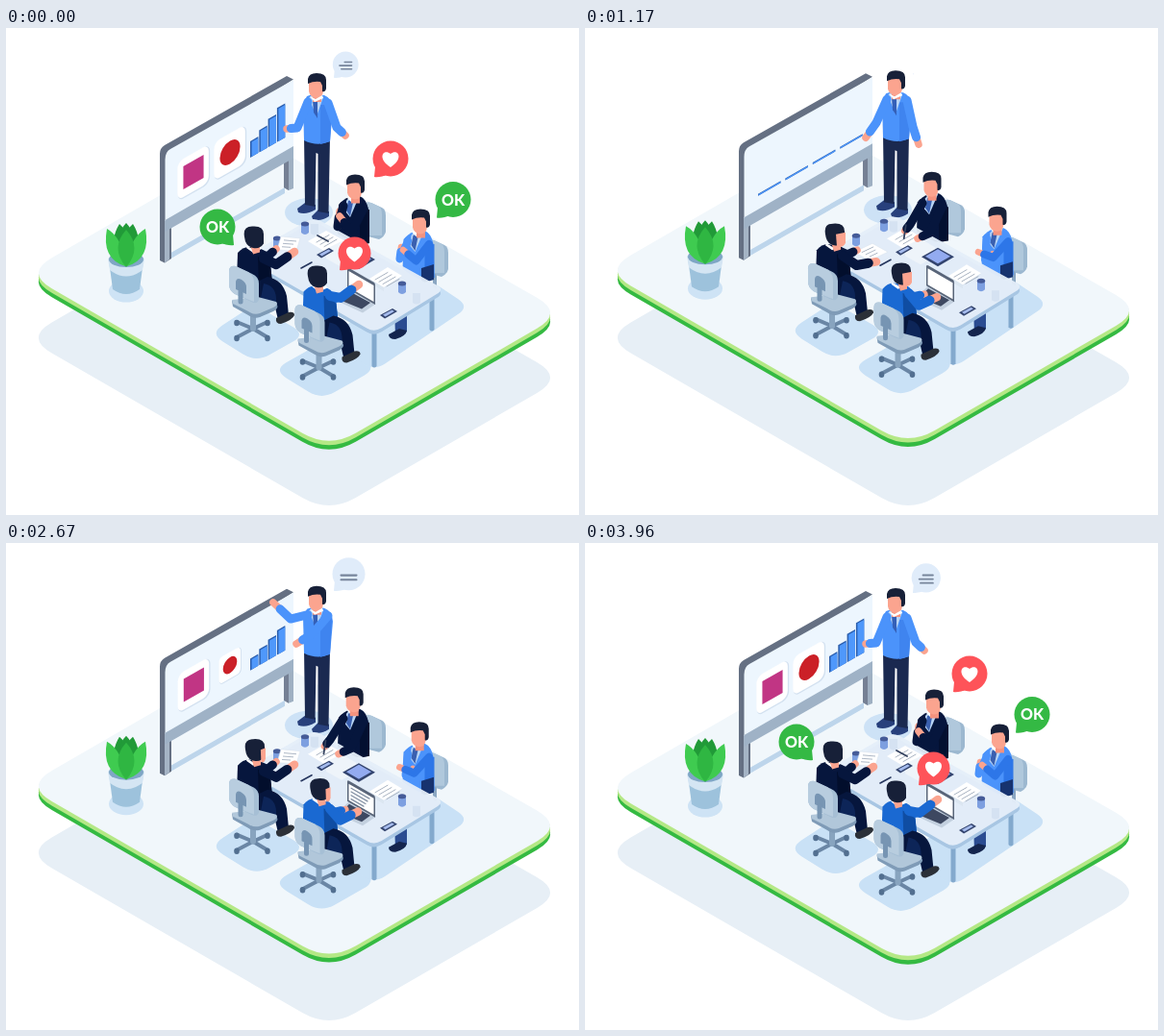
These frames come from a looping animation (596x507 px, 3.99 s). An HTML page:

```html
<!DOCTYPE html>
<html lang="en">
<head>
<meta charset="utf-8">
<title>Team meeting</title>
<style>
html, body { margin: 0; width: 100%; height: 100%; overflow: hidden; background: #fff; }
svg { display: block; width: 596px; height: 507px; }
text { font: 800 16px Lato, Inter, sans-serif; fill: #fff; text-anchor: middle; }
.arm { fill: none; stroke-linecap: round; stroke-linejoin: round; }
</style>
</head>
<body>
<script>
const LOOP = 3990, ISO = .577;
const SKIN = '#fba48f', HAIR = '#172038', NAVY = '#06163d', BLUE = '#4b93fb', ROYAL = '#1a69d2', FLOOR = '#c9e1f6';

// ---- easing ----
const mix = (a, b, u) => a + (b - a) * u;
const mixAll = (a, b, u) => a.map((v, i) => mix(v, b[i], u));
function ramp(t, from, to) {
  const u = Math.min(1, Math.max(0, (t - from) / (to - from)));
  return u * u * (3 - 2 * u);
}
// shown from `start` on, over the loop's end, until `stop`
const wrap = (t, start, stop, span) => t < LOOP / 2 ? 1 - ramp(t, stop - span, stop) : ramp(t, start, start + span);

const busy = (t, release = 2600) => ramp(t, 250, 650) - ramp(t, release, release + 450);
const laid = t => ramp(t, 450, 1100) - ramp(t, 1250, 1700);

// ---- shape helpers ----
const path = (d, fill, more = '') => `<path d="${d}" fill="${fill}" ${more}/>`;
const line = (d, stroke, w, more = '') =>
  `<path d="${d}" fill="none" stroke="${stroke}" stroke-width="${w}" stroke-linecap="round" ${more}/>`;
const oval = (x, y, rx, ry, fill) => `<ellipse cx="${x}" cy="${y}" rx="${rx}" ry="${ry}" fill="${fill}"/>`;
const at = (x, y, body) => `<g transform="translate(${x} ${y})">${body}</g>`;
const repeat = (n, f) => Array.from({ length: n }, (_, i) => f(i)).join('');

// polygon with corners rounded over a distance r
function rounded(pts, r) {
  const toward = (p, q) => mixAll(p, q, r / Math.hypot(q[0] - p[0], q[1] - p[1]));
  return pts.map((p, i) => {
    const n = pts.length;
    return `${i ? 'L' : 'M'}${toward(p, pts[(i + n - 1) % n])}Q${p} ${toward(p, pts[(i + 1) % n])}`;
  }).join('') + 'Z';
}

// an arm is a shoulder, a moving hand and an elbow that hangs between them
const arms = [];
function arm(color, w, shoulder, reach, lean, hand) {
  arms.push({ shoulder, reach, lean, hand });
  return `<g class="arm"><path stroke="${SKIN}" stroke-width="${w - 1.5}"/><path stroke="${color}" stroke-width="${w}"/></g>`;
}
const between = (rest, work, release) => t => mixAll(rest, work, busy(t, release));

const bubbles = [];
function bubble(x, y, dir, color, r, body, start, stop) {
  bubbles.push({ x, y, dir, start, stop });
  const cx = dir * (r - 1.5), cy = .5 - r;
  return `<g class="bubble">${path(`M0,1L${dir * 1.5},-15L${dir * 15},-2Q${dir * 6},2 0,1Z`, color)}
    ${oval(cx, cy, r, r, color)}${at(cx, cy, `<g class="inside">${body}</g>`)}</g>`;
}
const heart = path('M0,9C-15,-1 -7,-11 0,-5C7,-11 15,-1 0,9Z', '#fff');
const ok = '<text y="6">OK</text>';

// ---- room ----
const slab = rounded([[20, 254.5], [263, 114], [580, 296], [336, 437]], 32);
const tableTop = rounded([[320, 197], [456, 272], [383, 317], [247, 239]], 9);

const board =
  path('M168,236L290,166V172L168,242Z', '#bdd5eb') +
  path('M289,139L299,133V167L294,169L289,166Z', '#9fb0c2') + path('M289,139L294,137V169L289,166Z', '#758094') +
  path('M160,242V131Q160,125 165,122L292,50L299,53.5L172,134V240L165,244.5Z', '#657083') +
  path('M165,200L170,198V241L165,244.5Z', '#a5b4c5') +
  path('M165.5,201V137Q165.5,129 171,126L299,54V124Z', '#edf6fe') +
  path('M165.5,200L299,123V135.500L165.5,212Z'.replace('.500', '.5'), '#9fb2c6');

const sideLeaf = path('M124,248Q99,240 105,209Q120,217 126,247Z', '#3fcb50');
const plant = oval(125, 274, 18, 11.5, '#cee3f5') +
  path('M107,242H143L139,272Q125,282 111,272Z', '#9dc2dc') +
  path('M106,240Q125,230 144,240L142,252Q125,265 108,252Z', '#d4e5f3') + oval(125, 241, 18, 8, '#7fa6c5') +
  path('M112,240Q109,218 118,204L125,211L132,204Q141,218 138,240Z', '#219a38') +
  sideLeaf + `<g transform="translate(250 0) scale(-1 1)">${sideLeaf}</g>` +
  path('M125,203Q131,209 131,216H119Q119,209 125,203Z', '#219a38') +
  path('M125,249Q108,229 125,210Q142,229 125,249Z', '#2fb642');

const cup = (x, y) => path(`M${x - 4},${y - 5}v9q4,4 8,0v-9Z`, '#7d9fe0') + oval(x, y - 5, 4.2, 2.5, '#455b98');
const glass = (x, y) => path(`M${x},${y}h8v10q-4,3 -8,0z`, '#d5e2f2');
const phone = (x, y) => at(x, y, path('M-9,2L4,-5L9,-2L-4,5.5Z', '#34456f') + path('M-6,1.5L3.5,-3.5L6,-2L-3.5,3.5Z', '#a5bbed'));
const textLines = (x, y, n) => repeat(n, i => line(`M${x + i * 4},${y + i * 2.3}l13,-7.5`, '#aab4c2', 1));

const tableItems =
  path('M314,222L333,211L353,222L334,234Z', '#fff') + textLines(323, 223, 3) +
  path('M333,230L349,222L364,231V241L349,249L333,240Z', '#eef4fa') + cup(311, 209) + glass(317, 204) + phone(332, 234) +
  path('M350,241L367,231.5L384,241L367,251Z', '#33446f') + path('M354,240.5L367,233L380,240.5L367,248Z', '#93abf0') +
  path('M378,262L397,250L412,259L393,271V274L378,265Z', '#dbe6f1') + path('M378,261L397,249L412,258L393,270Z', '#fff') +
  textLines(384, 262, 4) + cup(412, 271) + glass(423, 276) + phone(398, 297) +
  line('M307,250L318,244', '#26365e', 1.6) +
  path('M344,284L357,271L385,287L371,296.5Z', '#c3d0df') + path('M348,283.5L357,274L379,286L370,292.5Z', '#3d4861') +
  path('M355,251Q355,249 357,250L383,265Q384,266 384,268V288L355,271Z', '#596579') +
  path('M356.5,253L382.5,268V285L356.5,270Z', '#fff') + repeat(4, () => line('', '#8390a3', 1.3, 'class="typed"'));

// ---- people and seats ----
const face = path('M319,68H328V77H319Z', '#f4937f') + path('M315,55H330V66Q329,73 323,73Q316,72 315,66Z', SKIN) +
  path('M314,58V53Q315,47 323,47Q333,47 333,54V63Q332,67 329,66V60L327,56Q320,55 314,58Z', HAIR);
const seatedHead = (x, y) => at(x, y, `<g class="nod">${face}</g>`);
const backHead = path('M253,222H264V233L257,235Z', SKIN) +
  path('M248,217Q246,206 256,206Q268,205 268,214V224Q264,230 257,228.5Q249,227 248,217Z', HAIR) +
  `<g class="profile">${path('M259,217L269,215V226Q267,231 260,230Z', SKIN)}</g>`;

const backSeat = path('M373,186Q373,180 380,182L391,187Q395,189 395,195V212Q394,217 388,220L373,216Z', '#9cb8d0') +
  path('M373,186Q373,180 380,182L388,186Q391,188 391,194V216L373,216Z', '#b0c8dc');
const frontTorso = (c, shade) =>
  path('M346,184Q351,178 357,176L368,175Q375,178 377,189L378,224L360,226L345,215Z', c) +
  path('M368,190L378,189V224L368,226Z', shade) + path('M354,180L359,174L367,176L358,197L353,191Z', '#b9d5f5') +
  path('M356,180L362,177L358,196L354,190Z', '#3a60b0') + path('M355,177L359,181L366,177L367,174L357,173Z', '#fff');
const backTorso = (c, shade) =>
  path('M241,234Q247,227 254,228L265,230Q273,233 275,246L277,266L250,272L240,262Z', c) +
  path('M262,238L275,246L277,266L263,270Z', shade) + path('M250,229L257,234L266,230L264,227L258,231L251,227Z', '#fff');
const legs = path('M250,270L272,259Q288,262 292,279L294,299L283,304L280,291L258,292Z', NAVY) +
  path('M268,266Q280,268 281,281V292L263,291Z', '#0d2558') +
  path('M281,302L294,296Q300,295 300,299Q298,304 286,308Q280,308 281,302Z', '#2b3038');
const chair =
  repeat(4, i => {
    const x = i < 2 ? 240 : 272, y = i % 2 ? 322 : 306;
    return line(`M257,313L${x},${y}`, '#6a86a5', 4) + oval(x, y + 1, 2.8, 3.2, '#526f90');
  }) +
  line('M257,298V313', '#88a4bf', 6) +
  path('M235,284L262,282L281,287Q285,291 278,295L264,301Q258,303 252,299L236,290Z', '#7f9bb7') +
  path('M235,283L262,280L281,285Q284,288 278,291L264,297Q258,299 252,295L236,287Z', '#b1c7da') +
  path('M232,253Q232,247 239,248L256,256Q263,259 263,266V283Q261,288 255,285L238,277Q232,273 232,267Z', '#a6bfd5') +
  path('M232,253Q232,247 239,248L252,254Q258,258 258,265V285L238,277Q232,273 232,267Z', '#b8cddf') +
  path('M239,264Q240,259 245,262Q250,265 250,270V277L239,272Z', '#7795b3') + line('M244,274V285', '#7795b3', 5);

// presenter's gestures: time, left hand, right hand
const gestures = [
  [0, 292, 105, 353, 112], [690, 291, 104, 357, 107], [1170, 292, 117, 347, 124],
  [1770, 273, 89, 319, 103], [2250, 271, 79, 302, 103], [3060, 284, 51, 302, 111], [3700, 292, 105, 353, 112]];
function gesture(t) {
  const i = gestures.findIndex(g => g[0] > t);
  if (i < 0) return gestures[0].slice(1);
  const [a, b] = [gestures[i - 1], gestures[i]];
  return mixAll(a, b, ramp(t, a[0], b[0])).slice(1);
}

const presenter = oval(315, 192, 25, 15, '#cde2f6') +
  path('M303,188L311,182L322,184V189Q312,195 304,192Z', '#28407c') +
  path('M318,196L325,189L336,191V196Q327,202 319,199Z', '#28407c') +
  path('M310,112H337L335.5,193L324.5,191V131L322.5,130L321.5,186L311,184Z', '#1a2950') +
  path('M313,71L319,69L331,70Q339,73 340,84L337,118Q324,124 310,117L309,79Z', BLUE) +
  path('M327,80L339,80L337,118L327,121Z', '#3f84ef') +
  path('M315,73L319,69L330,72L323,92Z', '#b9d5f5') + path('M319,75L324,74L324,94L320,88Z', '#3460b8') +
  face + path('M316,71L321,77L330,73L329,70L322,74Z', '#fff') +
  arm(BLUE, 9, [335, 78], 21, 0, t => gesture(t).slice(2)) +
  arm(BLUE, 9, [314, 77], 22, 0, t => gesture(t).slice(0, 2));

const card = mark => `<g class="card"><rect x="-18.5" y="-19.5" width="38" height="41" rx="7" fill="#d3e1f0"/>
  <rect x="-19" y="-20" width="37" height="40" rx="7" fill="#fff"/>${mark}</g>`;

document.body.innerHTML = `<svg viewBox="0 0 596 507">
${path(slab, '#e7eff6', 'transform="translate(0 68)"')}
<g id="scene">
  ${repeat(5, i => path(slab, ['#35ba42', '#35ba42', '#b5e886', '#b5e886', '#f1f7fb'][i], `transform="translate(0 ${9.8 - i * 2.25})"`))}
  ${path(rounded([[212, 318], [258, 288], [312, 319], [260, 348]], 16), FLOOR)}
  ${path(rounded([[278, 356], [345, 318], [386, 354], [328, 387]], 16), FLOOR)}
  ${path(rounded([[330, 322], [440, 262], [482, 290], [383, 357]], 14), FLOOR)}
  ${plant}${board}
  ${repeat(4, () => '<g class="bar"><path fill="#2a5dac"/><path fill="#4f98fb"/></g>')}
  ${card('<rect x="-12" y="-12" width="24" height="24" fill="#c13584"/>')}${card('<circle r="12" fill="#cb2027"/>')}
  ${presenter}
  ${backSeat}${at(65, 39, backSeat + line('M381,219V232', '#8ba7c2', 4))}
  ${frontTorso(NAVY, '#031030')}${seatedHead(40, 105.5)}
  ${at(67.5, 36, frontTorso(BLUE, '#2d76e8'))}${seatedHead(108, 141.5)}
  ${path('M432,250L445,246V262L432,266Z', '#17336f')}
  ${path('M404,290L417,286V316L405,322Z', '#2b4c91')}${path('M398,319L409,313L417,315Q416,321 405,324Q398,324 398,319Z', '#14254e')}
  ${path('M380.5,314h5v38q-2.5,3 -5,0z', '#83a9cd')}${path('M440.5,278h5v36q-2.5,3 -5,0z', '#83a9cd')}
  ${path(tableTop, '#a8c6e3', 'transform="translate(0 4)"')}${path(tableTop, '#e5eff9', 'opacity=".95"')}
  ${tableItems}
  ${arm(NAVY, 9, [351, 185], 19, -4, writingHand)}
  ${arm(NAVY, 9, [372, 188], 24, 0, between([347, 196], [346, 222], 2900))}
  ${line('', '#34425f', 1.8, 'id="pen"')}
  ${arm(BLUE, 8, [418, 222], 16, -5, between([411, 228], [424, 238]))}
  ${arm('#2d76e8', 8, [440, 225], 20, 0, between([413, 231], [409, 236]))}
  ${cup(282, 224)}
  <g id="sheet"><path fill="#fff" stroke="#dbe4ef" stroke-width=".6"/><path fill="none" stroke="#aeb8c6"/></g>
  ${arm(NAVY, 9, [263, 234], 11, 0, t => [281 + 2 * laid(t), 230 + 4 * laid(t)])}
  ${backTorso(NAVY, '#020e2c')}${legs}
  ${arm(NAVY, 10, [268, 240], 19, -3, t => [300 + 3 * laid(t), 233 + 13 * laid(t)])}
  <g class="head">${backHead}</g>${chair}
  ${arm(ROYAL, 9, [331, 276], 11, 0, between([351, 279], [353, 280]))}
  ${at(68.5, 40.5, backTorso(ROYAL, '#0f4da3') + legs)}
  ${arm(ROYAL, 10, [337, 279], 18, -4, reachingHand)}
  <g class="head">${backHead}</g>${at(68.5, 40.5, chair)}
  ${bubble(341, 51, 1, '#e0ecfa', 17, repeat(3, () => line('', '#77859b', 2.1, 'class="talk"')), 1140, 330)}
  ${bubble(383, 154, 1, '#fe5359', 18.5, heart, 3350, 420)}
  ${bubble(347, 251, 1, '#fe5359', 17, heart, 2950, 760)}
  ${bubble(448, 196.5, 1, '#34b944', 18.5, ok, 2750, 850)}
  ${bubble(237, 225, -1, '#34b944', 18.5, ok, 3200, 960)}
</g></svg>`;

function writingHand(t) {
  const [x, y] = between([347, 191], [331, 214], 2900)(t);
  return [x + 2 * busy(t, 2900) * Math.sin(t / 140), y];
}
// goes up in an arc before it reaches for the laptop
function reachingHand(t) {
  const [x, y] = between([367, 267], [366, 283])(t), lift = Math.sin(Math.PI * ramp(t, 2800, 3400));
  return [x - 15 * lift, y - 11 * lift];
}

// ---- motion ----
const $ = s => document.querySelector(s);
const set = (el, name, value) => el.setAttribute(name, value);
const each = (name, f) => document.querySelectorAll('.' + name).forEach(f);

const heldSheet = [286, 217, 306, 219, 302, 232, 282, 231], flatSheet = [280, 236, 299, 227, 315, 236, 296, 245];

function drawArms(t) {
  each('arm', (g, i) => {
    const { shoulder, reach, lean, hand } = arms[i], h = hand(t);
    const half = Math.hypot(h[0] - shoulder[0], h[1] - shoulder[1]) / 2;
    const [mx, my] = mixAll(shoulder, h, .5);
    const elbow = [mx + lean, my + Math.sqrt(Math.max(20, reach * reach - half * half))];
    set(g.children[0], 'd', `M${elbow}L${h}`);
    set(g.children[1], 'd', `M${shoulder}L${elbow}L${mixAll(elbow, h, .6)}`);
  });
}

// the bars slide apart and sink one after another, gather again, then grow
function drawBoard(t) {
  each('bar', (g, i) => {
    const spread = ramp(t, 456 + 48 * i, 1056 + 48 * i) - ramp(t, 1462 - 77 * i, 2162 - 77 * i);
    const size = t < 1300 ? 1 - spread ** 1.4 : .45 * ramp(t, 1300, 1750) + .55 * ramp(t, 2400, 2950);
    const x = mix(254 + 9.3 * i, 180 + 28.4 * i, spread), w = mix(8.4, 23.5, spread);
    const h = Math.max(2, (17 + 6.2 * i) * size), y = 281.5 - x * ISO, edge = Math.min(1.5, h / 4);
    const bar = (x, y, w, h) => `M${x},${y}v${-h}l${w},${-w * ISO}v${h}Z`;
    set(g.children[0], 'd', bar(x, y, w, h));
    set(g.children[1], 'd', bar(x + edge, y - edge * ISO, w - edge, h - edge));
  });
  each('card', (g, i) => {
    const slide = i ? 0 : 1 - ramp(t, 900, 1000) + ramp(t, 2300, 2700);
    const x = (i ? 233 : 219) - 24 * slide, y = (i ? 129.5 : 137) + 13 * slide;
    const s = wrap(t, 1850 + 600 * i, 850, 350 + 100 * (t < 1000));
    set(g, 'transform', `translate(${x} ${y}) matrix(${.88 * s} ${-.508 * s} 0 ${s} 0 0)`);
  });
}

// bubbles pop up tilted, their contents a moment later
function drawBubbles(t) {
  each('bubble', (g, i) => {
    const { x, y, dir, start, stop } = bubbles[i], shrink = i ? 1 : 1 - .14 * ramp(t, 3890, LOOP);
    const size = wrap(t, start, stop, t < start ? 400 : 270) * (!i && t < 600 ? .86 : shrink);
    const shown = i || t < 600 ? size : ramp(t, start, start + 300) * shrink;
    const tilt = t > start ? -9 * dir * (1 - ramp(t, start + 300, start + 600)) : 0;
    set(g, 'transform', `translate(${x} ${y}) rotate(${i ? tilt : 0}) scale(${shown})`);
    const inside = i && t > start ? ramp(t, start + 80, start + 430) : 1;
    set(g.querySelector('.inside'), 'transform', `scale(${inside})`);
  });
  // speech lines are written one by one and push the older ones up
  const starts = [1500, 2000, 2920], live = t > 1100;
  each('talk', (el, i) => {
    const written = live ? ramp(t, starts[i], starts[i] + 220) : 1;
    const rise = starts.slice(i + 1).reduce((n, s) => n + (live ? ramp(t, s - 150, s) : 1), 0);
    const cut = live ? ramp(t, 3860, 4080) : .68;
    const left = -8 + [10, 0, 3.5][i] * cut, right = -8 + 16 * written;
    set(el, 'd', written > .02 && right > left ? `M${left},${6 - 4.6 * rise}H${right}` : '');
  });
}

function drawTable(t) {
  each('typed', (el, i) => {
    const n = (19 - 2 * i) * ramp(t, 1450 + i * 220, 1750 + i * 220) * (1 - ramp(t, 2700, 2950));
    set(el, 'd', n > .2 ? `M359,${257.5 + i * 3.8}l${n},${n * ISO}` : '');
  });
  const p = mixAll(heldSheet, flatSheet, laid(t)), [sheet, rules] = $('#sheet').children;
  const [a, b, c, d] = [0, 2, 4, 6].map(i => p.slice(i, i + 2));
  set(sheet, 'd', `M${a}L${b}L${c}L${d}Z`);
  set(rules, 'd', [.25, .5, .75].map(u => {
    const l = mixAll(a, d, u), r = mixAll(b, c, u);
    return `M${mixAll(l, r, .2)}L${mixAll(l, r, .95 - u * .4)}`;
  }).join(''));
  const [x, y] = writingHand(t);
  set($('#pen'), 'd', t > 800 && t < 2800 ? `M${x + 1},${y - 6}L${x - 1},${y + 8}` : 'M324,216L335,222');
}

function drawHeads(t) {
  const turn = busy(t, 2450);
  each('nod', el => set(el, 'transform', `translate(${-2.5 * turn} 0)`));
  each('profile', el => set(el, 'transform', `translate(269 0) scale(${turn} 1) translate(-269 0)`));
  each('head', (el, i) => set(el, 'transform', `translate(${i ? 66 + 5 * turn : 2 * turn} ${i ? 41.5 : .5})`));
}

function frame() {
  const t = performance.now() % LOOP;
  set($('#scene'), 'transform', `translate(0 ${1.5 * Math.cos(t / LOOP * 4 * Math.PI) - 1.5})`);
  [drawArms, drawBoard, drawBubbles, drawTable, drawHeads].forEach(f => f(t));
  requestAnimationFrame(frame);
}
frame();
</script>
</body>
</html>
```
